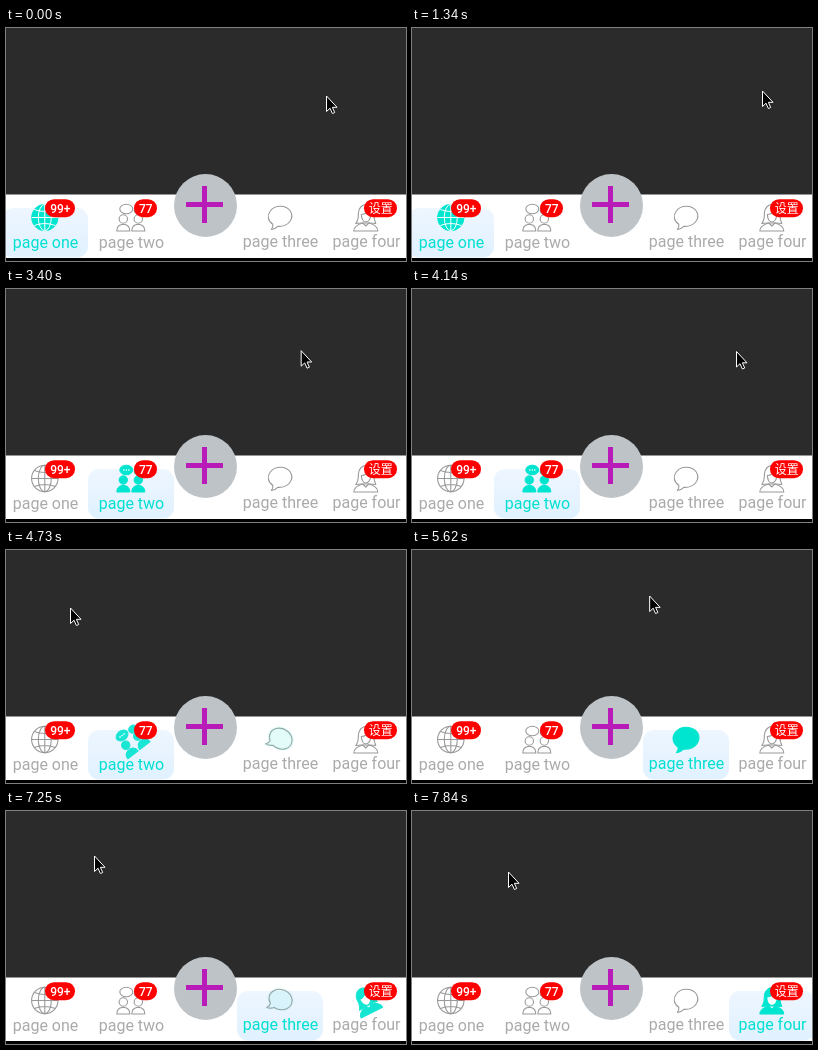
These frames come from a looping animation (400x233 px, 7990 ms). An HTML page:

```html
<!DOCTYPE html>
<html lang="en">
<head>
<meta charset="utf-8">
<title>Tab bar</title>
<style>
  html, body { margin: 0; width: 100%; height: 100%; overflow: hidden; background: #000; }
  svg { display: block; width: 100vw; height: 100vh; }
  text { text-anchor: middle; font-family: Roboto, "Noto Sans CJK SC", "Noto Sans CJK", sans-serif; }
  .label { font-size: 16px; }
  .badge { font-size: 12px; font-weight: 500; fill: #fff; }
  .line { fill: none; stroke: #999; stroke-width: 1.1; stroke-linecap: round; stroke-linejoin: round; }
  .solid { fill: #00e5d0; stroke: #00e5d0; stroke-width: 1; stroke-linejoin: round; }
  .solid .gap { fill: #fff; stroke: none; }
  .solid .grid { fill: none; stroke: #fff; }
</style>
</head>
<body>
<svg viewBox="0 0 400 233" preserveAspectRatio="none">
  <defs>
    <linearGradient id="glow" x1="0" y1="0" x2="0" y2="1">
      <stop offset="0" stop-color="#eef6ff"/>
      <stop offset="1" stop-color="#e0f1ff"/>
    </linearGradient>
  </defs>
  <rect width="400" height="167" fill="#2b2b2b"/>
  <rect y="166.5" width="400" height="63.5" fill="#fff"/>
  <g id="tabs"></g>
  <circle cx="199.5" cy="177.5" r="31.5" fill="#bdc3c7"/>
  <path d="M180 176.500H217M198.500 158V195" stroke="#b91bb9" stroke-width="5"/>
  <path id="cursor" d="M.5 0V15.500L4 12.200 6.400 17.500 8.700 16.500 6.400 11.300H11Z"
        fill="#000" stroke="#fff" stroke-width="1" stroke-linejoin="round"/>
</svg>
<script>
const LOOP = 7990, STEP = 147.9, LAST = 53;
const SPIN = 360;

// Icons are drawn around their own centre.
const disc = `<circle r="13.200"/>`;
const grid = `<ellipse rx="6.500" ry="13.200"/>
  <path d="M0-13.200V13.200M-13.200 0H13.200M-10.500-8Q0-4 10.500-8M-10.500 8Q0 4 10.500 8"/>`;

const person = x => `<circle cx="${x}" cy="1.500" r="4.200"/>
  <path d="M${x - 6.5} 13.500Q${x - 6.5} 8 ${x - 1.5} 7H${x + 1.5}Q${x + 6.5} 8 ${x + 6.5} 13.500Z"/>`;
const people = `<ellipse cx="-4.500" cy="-8.500" rx="6.500" ry="4.800"/>
  <ellipse cx="8" cy="-7" rx="4.500" ry="3.800"/>${person(-7.5)}${person(7.5)}`;
const dots = [-7, -4.5, -2].map(x => `<circle class="gap" cx="${x}" cy="-8.500" r=".8"/>`).join("");

const bubble = `<path d="M-8.500 12Q-6.500 9.500-7 6.800C-12 3.500-13-2-9.500-6.500
  -4.500-13 6-12.500 10.500-6.500 15 1 8.500 9.500-2 8.800Q-4.500 11.500-8.500 12Z"/>`;

const hair = `<path d="M-10 6Q-7 2-7.500-4C-7-16 8-16 8-4Q8 2 10 6L4 5.500H-4Z"/>`;
const face = `<path d="M-4.500-3Q1-3.500 3-7L5-3Q4.500 4 0 4.500-4 4-4.500-3Z"/>`;
const shoulders = `<path d="M-3 5.500Q-12 8-12 13.500H12Q12 8 3 5.500L0 8.500Z"/>`;

const tabs = [
  { x: 39, base: 220, name: "page one", badge: "99+", at: 54, size: 30,
    line: disc + grid, solid: `${disc}<g class="grid">${grid}</g>` },
  { x: 125, base: 219.5, name: "page two", badge: "77", at: 139.5, size: 23,
    line: people, solid: people + dots },
  { x: 274, base: 218.5, name: "page three",
    line: bubble, solid: `<g transform="scale(1.1)">${bubble}</g>` },
  { x: 360, base: 218.5, name: "page four", badge: "设置", at: 374.5, size: 33,
    line: hair + face + shoulders, solid: `${hair}<g class="gap">${face}</g>${shoulders}` }
];

const badge = t => !t.badge ? "" :
  `<rect x="${t.at - t.size / 2}" y="171.200" width="${t.size}" height="18" rx="9" fill="#f00"/>
   <text class="badge" x="${t.at + .3}" y="184.800">${t.badge}</text>`;

document.getElementById("tabs").innerHTML = tabs.map(t => `<g>
  <rect class="back" x="${t.x - 43}" y="180" width="86" height="49.500" rx="11" fill="url(#glow)"/>
  <g class="icon"><g class="line">${t.line}</g><g class="solid">${t.solid}</g></g>
  ${badge(t)}
  <text class="label" x="${t.x + .5}" y="${t.base}">${t.name}</text></g>`).join("");

const parts = [...document.querySelectorAll("#tabs > g")].map(g => {
  const part = {};
  for (const name of ["back", "icon", "line", "solid", "label"]) part[name] = g.querySelector("." + name);
  return part;
});
const cursor = document.getElementById("cursor");

const linear = f => f;
const easeIn = f => f ** 1.65;
const easeOut = f => 1 - (1 - f) ** 2.35;
const smooth = f => f * f * (3 - 2 * f);
const clamp = f => Math.min(1, Math.max(0, f));

// Turning points of the pointer, each with the easing that leads to it.
const turns = [
  { at: 0, x: 320, y: 68 },
  { at: 9, x: 350, y: 63, ease: easeOut },
  { at: 18, x: 30, y: 50, ease: linear },
  { at: 26, x: 324, y: 63, ease: easeOut },
  { at: 30, x: 324, y: 62, ease: linear },
  { at: 32, x: 64, y: 58, ease: easeIn },
  { at: 36, x: 16, y: 27, ease: linear },
  { at: 42, x: 376, y: 58, ease: easeOut },
  { at: 49, x: 88, y: 45, ease: easeIn },
  { at: 53, x: 96, y: 61, ease: linear }
];
const swipes = [{ from: 9, to: 21 }, { from: 31, to: 36 }, { from: 44, to: 50 }];

function pointer(step) {
  const i = Math.max(1, turns.findIndex(p => p.at >= step));
  const a = turns[i - 1], b = turns[i];
  const f = b.ease((step - a.at) / (b.at - a.at));
  return [a.x + (b.x - a.x) * f, a.y + (b.y - a.y) * f];
}

const pageAt = step => swipes.reduce((sum, s) => sum + smooth(clamp((step - s.from) / (s.to - s.from))), 0);

function draw(time) {
  const step = Math.min(LAST, Math.floor((time % LOOP + 8) / STEP));
  const page = pageAt(step), active = Math.floor(page);
  cursor.setAttribute("transform", `translate(${pointer(step)})`);
  parts.forEach((part, i) => {
    const amount = clamp(1 - Math.abs(page - i));
    // The icon that leaves turns back, the one that enters turns forward.
    const turn = SPIN * (i === active ? amount - 1 : amount);
    part.icon.setAttribute("transform", `translate(${tabs[i].x - .2} 189.500) rotate(${turn})`);
    part.line.setAttribute("opacity", 1 - amount);
    part.solid.setAttribute("opacity", amount);
    part.back.setAttribute("visibility", i === active ? "visible" : "hidden");
    part.label.setAttribute("fill", i === active ? "#00e0d2" : "#aaa");
  });
}

const start = performance.now();
function tick() {
  draw(performance.now() - start);
  requestAnimationFrame(tick);
}
tick();
</script>
</body>
</html>
```
